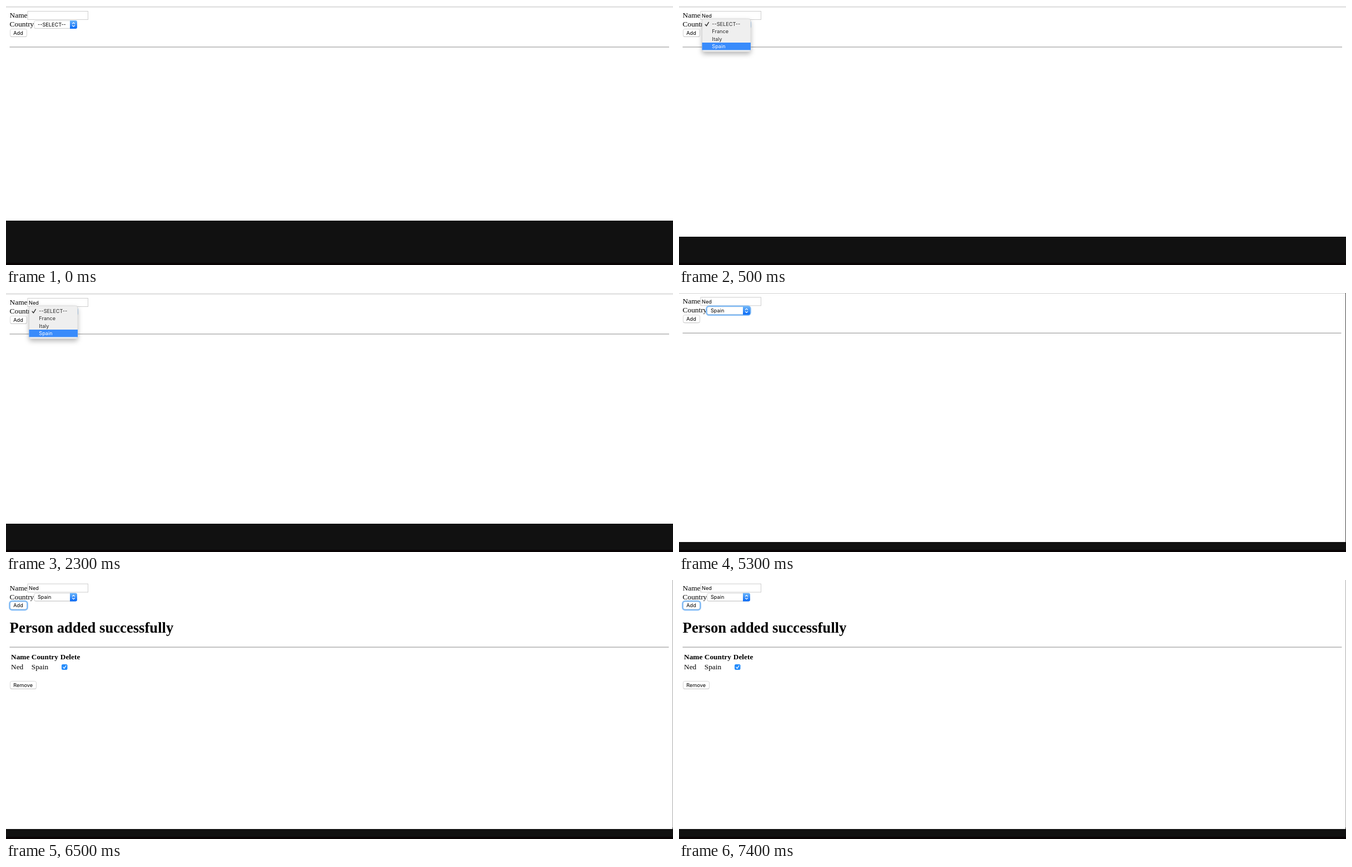
Animation, 1200 px wide and 467 px high, one loop 8 s. Source, as an HTML page:

```html
<!DOCTYPE html>
<html lang="en">
<head>
<meta charset="utf-8">
<title>Person form</title>
<style>
  html, body { margin: 0; width: 100%; height: 100%; overflow: hidden; background: #fff; }
  svg { display: block; width: 1200px; height: 467px; }
  text { font: 13.33px "Liberation Serif", serif; fill: #000; white-space: pre; }
  .ui { font: 9.17px Inter, sans-serif; }
  .bold { font-weight: bold; }
  .title { font-size: 26.67px; font-weight: bold; }
  .menu { fill: #2c2c2c; }
  .picked { fill: #fff; }
</style>
</head>
<body>
<svg id="stage" viewBox="0 0 1200 467">
  <defs>
    <linearGradient id="cap" x2="0" y2="1">
      <stop stop-color="#6cb5fa"/><stop offset="1" stop-color="#0869f6"/>
    </linearGradient>
    <filter id="shadow" x="-30%" y="-30%" width="160%" height="170%">
      <feDropShadow dx="0" dy="4" stdDeviation="4" flood-opacity=".28"/>
    </filter>
  </defs>
</svg>
<script>
const PERSON = 'Ned';
const LOOP = 8000;

const rect = (x, y, w, h, fill, more = '') =>
  `<rect x="${x}" y="${y}" width="${w}" height="${h}" fill="${fill}" ${more}/>`;
const text = (x, y, str, cls = '') => `<text x="${x}" y="${y}" class="${cls}">${str}</text>`;
const path = (d, color, width) =>
  `<path d="${d}" fill="none" stroke="${color}" stroke-width="${width}" stroke-linecap="round" stroke-linejoin="round"/>`;

const ring = (x, y, w, h) =>
  rect(x - 1, y - 1, w + 2, h + 2, 'none', 'rx="4.5" stroke="#82bbf5" stroke-width="2.6"');

function button(x, y, w, label, focus) {
  return rect(x + .5, y + 1, w - 1, 14, '#bdbdbd', 'rx="3"') +
    rect(x + .5, y + .5, w - 1, 13.7, '#fff', 'rx="3" stroke="#cfcfcf" stroke-width=".8"') +
    (focus ? ring(x + .5, y + .5, w - 1, 14) : '') +
    text(x + 6.3, y + 10.7, label, 'ui');
}

function select(value, focus) {
  return rect(50.5, 27, 77, 14, '#c4c4c4', 'rx="3"') +
    rect(50.5, 26.5, 77, 13.8, '#fff', 'rx="3" stroke="#cfcfcf" stroke-width=".8"') +
    (focus ? ring(50.5, 26.5, 77, 14) : '') +
    '<path d="M115 26h10a3 3 0 0 1 3 3v9a3 3 0 0 1-3 3h-10z" fill="url(#cap)"/>' +
    path('M119.4 32l2.1-2.2 2.1 2.2M119.4 35l2.1 2.2 2.1-2.2', '#fff', 1.1) +
    text(57, 36.8, value, 'ui');
}

function form({ dy, name = '', country, focus }) {
  return `<g transform="translate(0 ${dy})">` +
    text(6.6, 21, 'Name') + text(6.6, 37, 'Country') +
    rect(39, 9.5, 108.5, 15, '#fff', 'stroke="#cdcdcd"') +
    text(41, 20.7, name, 'ui') +
    select(country, focus === 'select') +
    button(7, 41, 31, 'Add', focus === 'add') + '</g>';
}

function menu() {
  const row = (str, i, cls = 'menu') => text(59.3, 36.1 + i * 13.35, str, 'ui ' + cls);
  return rect(41.5, 23, 87.5, 59.5, '#efefef', 'rx="4" stroke="#c6c6c6" stroke-width=".6" filter="url(#shadow)"') +
    rect(41.5, 66, 87.5, 13.4, '#398bfb') +
    path('M47.2 33.2l2.2 2.7 4-6.5', '#2c2c2c', 1.4) +
    row('--SELECT--', 0) + row('France', 1) + row('Italy', 2) + row('Spain', 3, 'picked');
}

function table() {
  return text(6.6, 95, 'Person added successfully', 'title') +
    text(9, 143, 'Name', 'bold') + text(45.8, 143, 'Country', 'bold') + text(97.8, 143, 'Delete', 'bold') +
    text(9, 161.2, PERSON) + text(45.8, 161.2, 'Spain') +
    rect(100, 152, 10.5, 10, '#238bfb', 'rx="2.3"') +
    path('M102.8 157.2l1.9 2.2 3.2-4.9', '#fff', 1.3) +
    button(7, 182, 48, 'Remove');
}

const rule = (y, right) => rect(6.5, y, right - 6.5, 1.4, '#ababab');
const floor = y => rect(0, y, 1200, 467 - y, '#111') + rect(0, 463, 1200, 4, '#0a0506');
const topBar = rect(0, 0, 1200, 3, '#f0f0f0') + rect(0, 1, 1200, 1.5, '#dedede');

const scenes = [
  [0, topBar + form({ dy: 0, country: '--SELECT--' }) + rule(73.3, 1193) + floor(387)],
  [500, topBar + form({ dy: 0, name: PERSON, country: '--SELECT--', focus: 'select' }) +
    rule(73.3, 1193) + menu() + floor(416)],
  [3500, rect(0, 0, 1200, 1, '#d2d2d2') +
    form({ dy: -1.7, name: PERSON, country: 'Spain', focus: 'select' }) +
    rule(71.6, 1191.5) + rect(1199, 0, 1, 449, '#444') + floor(449)],
  [6500, form({ dy: -2.5, name: PERSON, country: 'Spain', focus: 'add' }) +
    rule(120.4, 1192.5) + table() + rect(1199, 0, 1, 446, '#aaa') +
    rect(1199, 446, 1, 3, '#444') + floor(449)]
];

const stage = document.getElementById('stage');
stage.insertAdjacentHTML('beforeend',
  scenes.map(([, body]) => `<g class="scene" display="none">${body}</g>`).join(''));
const groups = stage.querySelectorAll('.scene');

const begin = performance.now();
function draw(now) {
  const t = Math.max(0, now - begin) % LOOP;
  const active = scenes.filter(([start]) => t >= start).length - 1;
  groups.forEach((g, i) => g.setAttribute('display', i === active ? 'inline' : 'none'));
  requestAnimationFrame(draw);
}
draw(begin);
</script>
</body>
</html>
```
